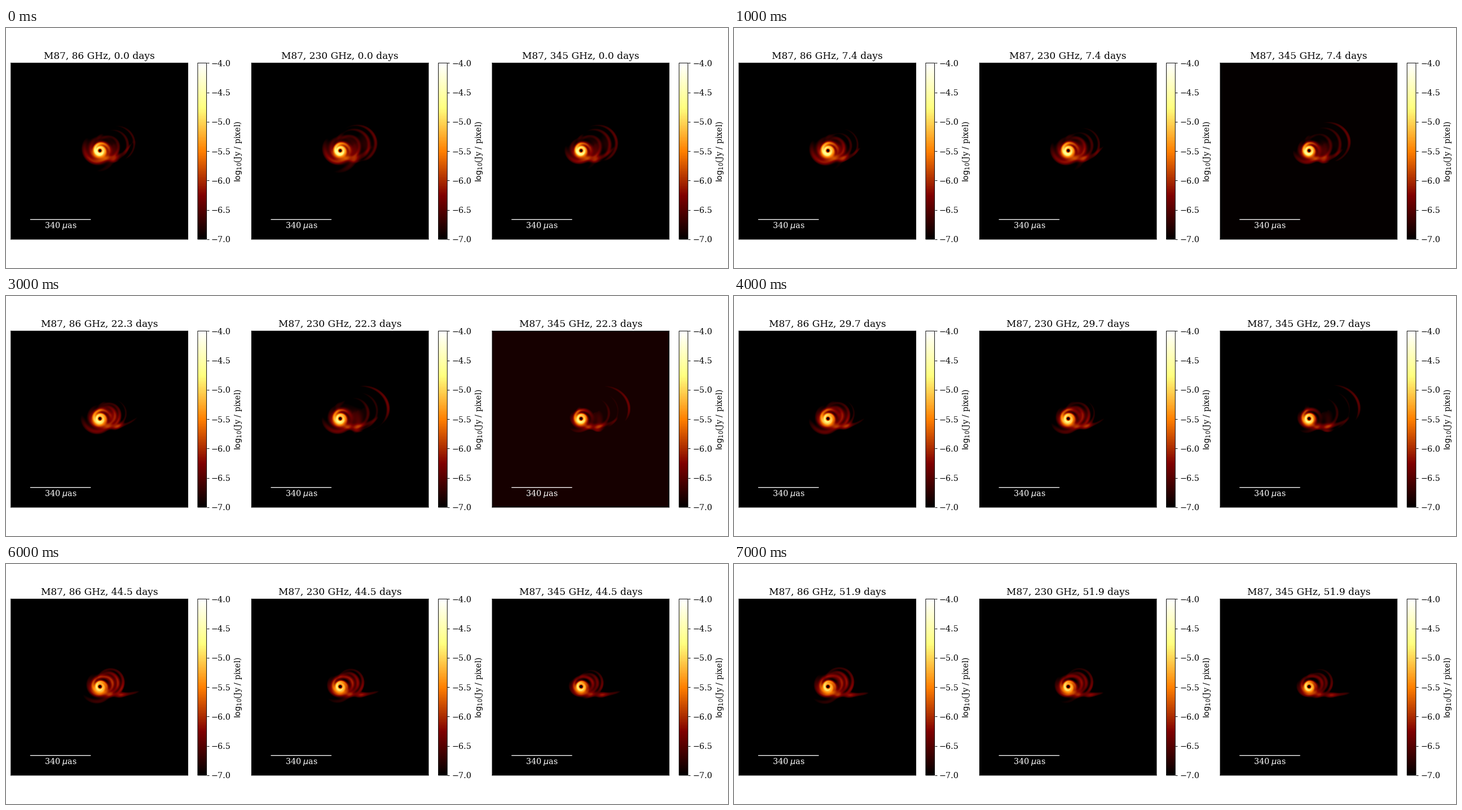
These frames come from a looping animation (1280 px wide and 427 px high, 8 s). A matplotlib script:

```python
import numpy as np
import matplotlib.pyplot as plt
from matplotlib.animation import FuncAnimation

W, H, DPI = 1280, 427, 64
FRAMES, INTERVAL = 8, 1000
DAYS_PER_FRAME = 7.42
PITCH, LEFT, BOTTOM, SIDE = W / 3, 8.7, 51.1, 313.6
GRID = 314

plt.rcParams.update({
    "font.family": "DejaVu Serif",
    "font.size": 16,
    "axes.titlesize": 19.2,
    "axes.titlepad": 8,
    "axes.labelpad": 4,
    "axes.linewidth": 1.07,
    "ytick.major.size": 4.67,
    "ytick.major.pad": 4.67,
    "ytick.major.width": 1.07,
    "path.snap": False,
})

# Values at these steps; steps between are interpolated.
KEYS = [0, 2, 3, 4, 6, 7]
BANDS = [
    dict(freq=86, squeeze=1.0,
         size=[33, 24, 25, 25, 22.5, 24],
         level=[-6.8, -6.55, -6.6, -6.65, -6.45, -6.5],
         reach=[58, 66, 73, 72, 77, 78],
         lift=[27, 16, 20, 18, 6, 2],
         haze=[0, 0, 0, 0, 0, 0]),
    dict(freq=230, squeeze=1.12,
         size=[34, 25, 46, 25, 22, 23],
         level=[-6.7, -6.65, -6.85, -6.65, -6.55, -6.6],
         reach=[54, 76, 70, 71, 75, 66],
         lift=[18, 26, 16, 18, 6, 2],
         haze=[0.8, 0, 0.4, 0, 0, 0]),
    dict(freq=345, squeeze=1.4,
         size=[34, 43, 46, 48, 20.5, 22],
         level=[-6.72, -6.8, -6.85, -6.92, -6.65, -6.7],
         reach=[58, 62, 68, 76, 77, 78],
         lift=[16, 12, 14, 16, 6, 2],
         haze=[0.6, 0.2, 0.2, 0, 0, 0]),
]
# Background level of the highest band.
FLOOR = [-8, -6.97, -6.94, -6.865, -8, -8, -8, -8]

axis = np.arange(GRID) - (GRID - 1) / 2
X, Y = np.meshgrid(axis - 0.4, axis - 0.7)
R = np.hypot(X, Y) + 1e-6
THETA = np.arctan2(Y, X)

rng = np.random.default_rng(4)
WAVES = [(m, k, rng.uniform(0, 2 * np.pi))
         for m, k in [(1, 4.5), (1, 8), (2, 6), (2, 11), (3, 9)]]


def swirl(step):
    """Trailing spiral streaks, stronger away from the hole."""
    total = sum(np.cos(m * THETA + k * np.log(R) + p - 0.5 * step)
                for m, k, p in WAVES)
    return 0.1 * total * np.clip((R - 3) / 9, 0.5, 1.3)


def core(step, squeeze):
    r = np.where(R < 7, R, 7 + (R - 7) * squeeze)
    level = np.interp(r, [0, 6, 8, 10, 12, 15, 20, 27, 34, 50],
                      [-4.75, -4.75, -4.95, -5.3, -5.65, -6.05, -6.5, -6.85, -7.3, -8.5])
    return 10 ** (level - 0.04 * step + 0.2 * np.cos(THETA - np.radians(225)))


def loop(s, level, width):
    """Bright-rimmed bubble that starts at the core and bulges up and right."""
    u = (X - 0.85 * s) / s
    v = (Y - 0.38 * s) / (s * (1.15 - 0.006 * s))
    rho = np.hypot(u, v)
    side = 0.28 * (np.cos(np.arctan2(v, u) + 0.35) - 1)
    rim = np.exp(-((rho - 1) * s / width) ** 2)
    fill = 0.3 * np.exp(-(rho / 0.95) ** 8)
    return 10 ** (level + side) * (rim + fill)


def tail(reach, lift):
    q = np.clip(X / reach, 0, 1)
    mid = -12 - 3 * np.sin(np.pi * q) + lift * q ** 3
    width = 4.8 - 2 * q
    ends = 1 / (1 + np.exp(-(X + 2) / 3)) / (1 + np.exp((X - reach + 3) / 3))
    return 10 ** (-6.1 - 0.65 * q) * np.exp(-((Y - mid) / width) ** 2) * ends


def glow(step, band):
    now = {name: np.interp(step, KEYS, band[name])
           for name in ("size", "level", "reach", "lift", "haze")}
    flux = core(step, band["squeeze"]) + tail(now["reach"], now["lift"])
    for i, frac in enumerate([1, 0.78, 0.56]):
        drift = 1 + 0.04 * np.sin(1.3 * step + 2 * i) * (i > 0)
        flux += loop(now["size"] * frac * drift, now["level"] + 0.12 * i, 2.6)
    spread = ((X - 25) / 48) ** 2 + ((Y + 4) / 34) ** 2
    flux += now["haze"] * 1.3e-7 * np.exp(-spread)
    flux *= 1 - 0.995 * np.exp(-(R / 4.5) ** 6)
    return np.log10(flux + 1e-9) + swirl(step)


def place(x, width):
    return fig.add_axes([x / W, BOTTOM / H, width / W, SIDE / H])


fig = plt.figure(figsize=(W / DPI, H / DPI), dpi=DPI, facecolor="white")
panels = []
for i, band in enumerate(BANDS):
    x0 = LEFT + i * PITCH
    ax = place(x0, SIDE)
    im = ax.imshow(np.full((GRID, GRID), -7.0), cmap="afmhot", vmin=-7, vmax=-4,
                   origin="lower", extent=(0, GRID, 0, GRID), aspect="auto",
                   interpolation="bilinear")
    ax.set(xticks=[], yticks=[], xlim=(0, GRID), ylim=(0, GRID))
    ax.plot([34.2, 141.8], [35.3, 35.3], color="white", lw=1.5,
            solid_capstyle="butt")
    ax.text(88.3, 20.2, r"340 $\mu$as", color="white", ha="center", va="baseline")
    bar = fig.colorbar(im, cax=place(x0 + 331.2, 15.7),
                       ticks=np.arange(-7, -3.9, 0.5))
    bar.set_label(r"$\mathrm{log}_{10}$(Jy / pixel)")
    panels.append((im, ax.set_title(""), band))


def draw(step):
    for im, title, band in panels:
        data = glow(step, band)
        if band["freq"] == 345:
            data = np.maximum(data, FLOOR[step])
        im.set_data(data)
        title.set_text(f"M87, {band['freq']} GHz, {step * DAYS_PER_FRAME:.1f} days")
    return [item for im, title, _ in panels for item in (im, title)]


anim = FuncAnimation(fig, draw, frames=FRAMES, interval=INTERVAL,
                     repeat=True, repeat_delay=0, blit=False)
plt.show()
```
